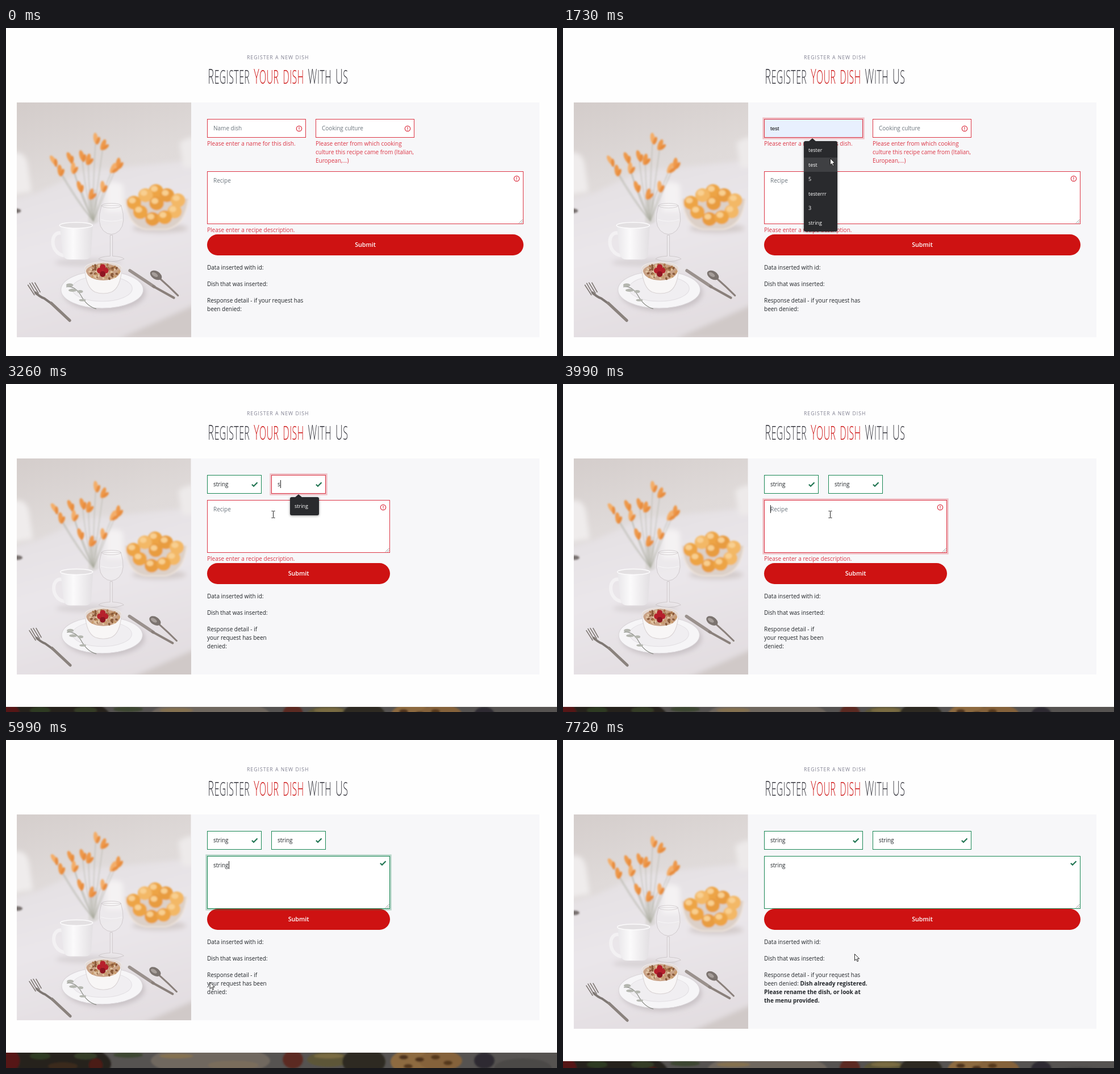
Animation of 970 by 577 pixels, one loop 8 s. Source, as an HTML page:

```html
<!DOCTYPE html>
<html lang="en">
<head>
<meta charset="utf-8">
<title>Register a dish</title>
<style>
  html, body { margin: 0; width: 100%; height: 100%; overflow: hidden; }
  body { background: #fefefe; font: 10px/15px "Open Sans", sans-serif; color: #212529; }
  #stage { position: relative; width: 970px; height: 577px; overflow: hidden; }
  .over, h2 { position: absolute; margin: 0; white-space: nowrap; text-transform: uppercase; }
  .over { left: 424px; top: 45px; font-size: 8.7px; letter-spacing: 1px; color: #7f7f90; }
  h2 { left: 0; top: 64px; width: 958px; display: flex; justify-content: center; font-size: 33px;
       line-height: 40px; font-weight: 300; color: #37373f; transform: scaleX(.48); }
  h2 span { white-space: pre; word-spacing: 5px; letter-spacing: 1px; }
  h2 b { font-size: 37px; font-weight: 300; }
  h2 em { font-style: normal; color: #ce1212; }
  #panel { position: absolute; left: 19px; top: 131px; width: 920px; box-sizing: border-box;
           padding: 29px 0 28px 335px; background: #f7f7f9; }
  #photo { position: absolute; left: 0; top: 0; width: 306.5px; height: 100%; }
  .row { display: flex; gap: 17px; align-items: flex-start; margin-bottom: 11px; }
  .col { white-space: nowrap; }
  .field { position: relative; box-sizing: border-box; height: 33px; padding: 0 10px; border: 1px solid;
           background: #fff; line-height: 31px; white-space: pre; }
  .field.area { height: 93px; padding-top: 8px; line-height: 15px; }
  .hint { color: #6c757d; }
  .preview { background: #e8f0fe; }
  .preview .hint { color: #000; font-family: "Liberation Sans", Arial, sans-serif; font-size: 9.6px; }
  .preview .icon { display: none; }
  .caret { display: inline-block; width: 1px; height: 14px; margin-right: -1px; vertical-align: -3px; background: #222; }
  .icon { position: absolute; right: 5.5px; top: 9.5px; width: 12px; height: 12px; fill: none; }
  .area .icon { top: 5.5px; }
  .grip { position: absolute; right: 0; bottom: 0; width: 8px; height: 8px; stroke: #777; stroke-width: .8; }
  .error { margin-top: 3px; color: #dc3545; }
  #submit { height: 37px; border-radius: 19px; color: #fff; font-size: 10.7px; line-height: 37px;
            font-weight: 600; text-align: center; }
  p { margin: 14px 0; white-space: nowrap; }
  #strip { position: absolute; left: -19px; top: calc(100% + 57px); width: 970px; height: 40px; }
  #menu { position: absolute; top: 199px; padding: 3px 0; border-radius: 3px; background: #292a2d;
          color: #fff; font-size: 9px; line-height: 25.5px; box-shadow: 0 1px 4px #0006; }
  #menu div { padding-left: 8px; }
  #menu .on { background: #3f4043; }
  #tip { position: absolute; top: 193.5px; border: solid transparent; border-width: 0 7px 6px; border-bottom-color: #292a2d; }
  #mouse { position: absolute; left: 0; top: 0; width: 1px; height: 1px; overflow: visible; }
</style>
</head>
<body>
<div id="stage">
  <div class="over">Register a new dish</div>
  <h2><span><b>R</b>egister <em><b>Y</b>our dish</em> <b>W</b>ith <b>U</b>s</span></h2>

  <div id="panel">
    <svg id="photo" viewBox="0 0 306 405" preserveAspectRatio="xMidYMid slice">
      <defs>
        <linearGradient id="wall" x2=".2" y2="1">
          <stop stop-color="#d3ccca"/><stop offset=".35" stop-color="#dfdad9"/><stop offset="1" stop-color="#e6e1e3"/>
        </linearGradient>
        <linearGradient id="cloth" x2=".3" y2="1">
          <stop stop-color="#e2dee0"/><stop offset=".5" stop-color="#eae6ea"/><stop offset="1" stop-color="#e2dde0"/>
        </linearGradient>
        <linearGradient id="china"><stop stop-color="#e9e7ea"/><stop offset=".4" stop-color="#fbfafb"/><stop offset="1" stop-color="#e2dfe2"/></linearGradient>
        <filter id="soft" x="-30%" y="-30%" width="160%" height="160%"><feGaussianBlur stdDeviation="4"/></filter>
        <filter id="haze" x="-30%" y="-30%" width="160%" height="160%"><feGaussianBlur stdDeviation="1.5"/></filter>
      </defs>
      <rect width="306" height="405" fill="url(#wall)"/>
      <g filter="url(#soft)">
        <path d="M-20 172L40 155 120 118 326 98V430H-20Z" fill="url(#cloth)"/>
        <path d="M-9 88Q18 80 22 110L28 154-9 160Z" fill="#efecec"/>
        <path d="M284 70Q300 56 320 62V112H290Z" fill="#edeaea"/>
        <path d="M156 142q12-10 30 0l2 46h-32z" fill="#f4f2f3"/>
        <path d="M326 342L178 408H326Z" fill="#d0c9c8"/>
        <ellipse cx="126" cy="276" rx="58" ry="7" fill="#d8d3d6"/>
        <ellipse cx="250" cy="217" rx="48" ry="8" fill="#d3cbca"/>
      </g>
      <ellipse cx="1" cy="187" rx="9" ry="4" fill="#77706e" filter="url(#haze)"/>
      <g filter="url(#haze)">
        <path d="M190 166Q194 214 226 219H262Q294 212 299 166Z" fill="#dcd0c8"/>
        <g id="fruit"></g>
        <path d="M190 166Q194 214 226 219H262Q294 212 299 166" fill="none" stroke="#efe6df" stroke-width="3" opacity=".7"/>
        <path d="M127 150L126 206Q134 214 143 206L140 150Z" fill="#cbc9c4" opacity=".5"/>
        <g id="flowers"></g>
      </g>
      <path d="M82 226C60 218 58 260 84 264" fill="none" stroke="#f3f1f3" stroke-width="6"/>
      <path d="M77 212L82 261Q84 271 94 271H120Q130 271 131 261L134 212Z" fill="url(#china)"/>
      <ellipse cx="105" cy="212" rx="28.5" ry="5" fill="#e3e0e2" stroke="#fcfbfc" stroke-width="1.5"/>
      <g fill="#fff" fill-opacity=".15" stroke="#b9b3b5" stroke-width=".8" stroke-opacity=".7">
        <path d="M149 178Q140 208 152 221 166 234 180 221 192 208 183 178Z"/>
        <ellipse cx="166" cy="178" rx="17" ry="4"/>
        <path d="M148 202q18 6 37 0" stroke="#fff" fill="none"/>
        <path d="M164 229v36q-17 1-20 5 22 9 44 0-3-4-20-5v-36z"/>
      </g>
      <ellipse cx="154" cy="328" rx="71" ry="32" fill="#c9c2c6" filter="url(#soft)"/>
      <ellipse cx="150" cy="323" rx="71" ry="32" fill="#f6f5f7" stroke="#d9d5d9"/>
      <ellipse cx="150" cy="321" rx="52" ry="22" fill="#f0eef1" stroke="#e2dfe3"/>
      <path d="M120 286Q122 320 138 327 152 332 166 327 182 320 184 286Z" fill="#f8f6f6" stroke="#d9d3d4"/>
      <ellipse cx="152" cy="286" rx="32" ry="11" fill="#e4dad4" stroke="#eeeaea"/>
      <path d="M122 291Q124 281 152 277 180 281 182 291 178 306 152 307 126 306 122 291Z" fill="#c9a286"/>
      <g id="granola"></g>
      <g fill="#b6202c"><circle cx="146" cy="290" r="5"/><circle cx="156" cy="290" r="5"/><circle cx="151" cy="284" r="5"/><circle cx="151" cy="296" r="5" fill="#8f1522"/></g>
      <path d="M88 318Q104 316 114 334T140 356" fill="none" stroke="#7d8078" stroke-width="1"/>
      <g fill="#b4b6af"><ellipse cx="94" cy="315" rx="6" ry="3"/><ellipse cx="99" cy="324" rx="7" ry="2.500"/><ellipse cx="112" cy="326" rx="5" ry="2.500"/><ellipse cx="116" cy="341" rx="6" ry="2"/></g>
      <g fill="none" stroke-linecap="round">
        <path d="M25 312L36 331M29 311L40 329M34 311L43 327M22 315L33 332" stroke="#7e7773" stroke-width="1.600"/>
        <path d="M35 328Q42 335 50 338L64 348" stroke="#7e7773" stroke-width="4"/>
        <path d="M62 346L94 376" stroke="#8a827d" stroke-width="5"/>
        <path d="M198 290L240 318" stroke="#9a918d" stroke-width="5.500"/>
        <path d="M238 317L274 337" stroke="#8a807b" stroke-width="4"/>
        <path d="M249 303Q266 318 281 333" stroke="#8a807b" stroke-width="3"/>
      </g>
      <ellipse cx="243" cy="298" rx="11" ry="7" transform="rotate(32 243 298)" fill="#7b736f"/>
      <ellipse cx="241" cy="297" rx="6" ry="3" transform="rotate(32 241 297)" fill="#a69e9a"/>
    </svg>

    <div id="form">
      <div class="row">
        <div class="col"><div class="field" id="name"></div><div class="error">Please enter a name for this dish.</div></div>
        <div class="col"><div class="field" id="culture"></div><div class="error">Please enter from which cooking<br>culture this recipe came from (Italian,<br>European,...)</div></div>
      </div>
      <div class="field area" id="recipe"></div><div class="error">Please enter a recipe description.</div>
      <div id="submit">Submit</div>
      <p>Data inserted with id:</p>
      <p>Dish that was inserted:</p>
      <p id="reply"></p>
    </div>

    <svg id="strip" viewBox="0 0 970 40"><rect width="970" height="40" fill="#565351"/><g id="food" filter="url(#haze)"></g></svg>
  </div>

  <div id="tip"></div>
  <div id="menu"></div>
  <svg id="mouse">
    <circle id="click" r="8.5" fill="#f5a614" opacity=".9"/>
    <path id="arrow" d="M0 0V11.5L2.7 9 4.6 13.2 6.4 12.4 4.6 8.3H8.2Z" fill="#fff" stroke="#111" stroke-width=".9"/>
    <path id="beam" d="M-3-6H-1Q0-6 0-5 0-6 1-6H3M0-5V5M-3 6H-1Q0 6 0 5 0 6 1 6H3" fill="none" stroke="#222"/>
    <path id="hand" d="M-1.3 1Q0-1 1.3 1V6Q3 5 4 6.5 5.5 5.7 6.3 7 8 6.5 8 8.5V12Q7.5 14 6.5 16.5H.5Q-1 13.5-3.5 10.5-3.5 8.5-1.3 10Z" fill="#fff" stroke="#111" stroke-width=".9"/>
  </svg>
</div>

<script>
const LOOP = 8000, BLINK = 530, FADE = 150;
const CLICK = 7060, REPLY = 7330;
const RED = [220, 53, 69], GREEN = [25, 135, 84], BRAND = [206, 18, 18], BRIGHT = [236, 39, 39];
const $ = id => document.getElementById(id);
const ramp = (t, from, span) => Math.min(1, Math.max(0, (t - from) / span));
const mix = (a, b, p) => a.map((v, i) => Math.round(v + (b[i] - v) * p));
const last = (list, t) => list.filter(k => k[0] <= t).pop();
const show = (el, on) => { el.style.display = on ? "" : "none"; };

// Still life details
let seed = 7;
const rand = () => (seed = seed * 16807 % 2147483647) / 2147483647;
const blob = (x, y, rx, ry, fill, turn = 0) =>
  `<ellipse cx="${x}" cy="${y}" rx="${rx}" ry="${ry}" fill="${fill}" transform="rotate(${turn} ${x} ${y})"/>`;

$("fruit").innerHTML = [[243, 153], [225, 160], [262, 160], [205, 173], [281, 169], [244, 174], [216, 189], [275, 188], [237, 201], [258, 198]]
  .map(([x, y], i) => blob(x, y, 12.5, 12, ["#eda445", "#f3b866", "#e89c40"][i % 3]) + blob(x - 3, y - 4, 6, 5, "#f8cf90")).join("");

$("flowers").innerHTML = [[66, 100], [77, 117], [94, 95], [100, 113], [115, 92], [126, 98], [139, 62], [152, 73], [178, 105], [169, 113], [111, 145], [131, 158], [151, 145]]
  .map(([x, y], i) => {
    const turn = (x - 128) * .35 + (i % 2 ? 12 : -12);
    return `<path d="M135 205Q${128 + (x - 128) * .45} 165 ${x} ${y}" fill="none" stroke="#a9aa9c" opacity=".75"/>`
      + blob(x, y, 4, 10, i % 3 ? "#ee984a" : "#f4ad68", turn) + blob(x + 4, y + 4, 3, 7, "#e88c3c", turn + 30);
  }).join("");

$("granola").innerHTML = Array.from({ length: 80 }, (_, i) => {
  const a = rand() * 6.283, r = Math.sqrt(rand());
  return blob(152 + 28 * r * Math.cos(a), 292 + 13 * r * Math.sin(a), 2.5, 1.8, ["#a9764c", "#c79a6d", "#8a5a3a", "#e0c4a2"][i % 4], a * 57);
}).join("");

$("food").innerHTML = [
  [75, 20, 110, 40, "#25201c"], [8, 14, 16, 18, "#571519"], [60, 6, 18, 6, "#2f3a22"], [100, 24, 26, 7, "#3a2a1e"], [140, 6, 20, 6, "#343d27"], [158, 22, 12, 12, "#4b1a18"],
  [215, 4, 26, 5, "#3d4630"], [360, 14, 105, 26, "#6f675f"], [300, 6, 30, 4, "#85714f"], [400, 22, 45, 8, "#7a6d5c"],
  [505, 12, 18, 16, "#5b2a24"], [568, 12, 38, 13, "#5d5638"], [568, 6, 26, 4, "#7a6c42"], [630, 16, 38, 24, "#2e2a20"],
  [715, 16, 38, 22, "#8d6a40"], [765, 14, 38, 18, "#85623a"], [700, 8, 8, 4, "#4d321d"], [728, 12, 8, 4, "#4d321d"], [756, 8, 8, 4, "#54381f"], [778, 18, 8, 4, "#54381f"], [708, 24, 8, 4, "#54381f"],
  [842, 14, 18, 14, "#2d2c31"], [910, 26, 50, 16, "#4b4847"]
].map(b => blob(...b)).join("");

// Form fields: when each gains focus, becomes valid, is typed into and loses focus
const letters = (times, word = "string") => times.map((t, i) => [t, word.slice(0, i + 1)]);
const fields = [
  { id: "name", label: "Name dish", focus: 1190, blink: 1200, valid: 2330, blur: 2930, keys: [[2330, "s"], [2730, "string"]] },
  { id: "culture", label: "Cooking culture", focus: 2930, blink: 2930, valid: 3260, blur: 3800, keys: [[3260, "s"], [3530, "string"]] },
  { id: "recipe", label: "Recipe", focus: 3800, blink: 3800, valid: 4060, blur: 6990, keys: letters([4060, 4320, 4460, 4550, 4630, 4720]) }
];
for (const f of fields) {
  const el = f.el = $(f.id);
  el.innerHTML = `<span class="val"></span><i class="caret"></i><span class="hint"></span>
    <svg class="icon bad" viewBox="0 0 12 12" stroke="#dc3545" stroke-width="1.2"><circle cx="6" cy="6" r="4.7"/><path d="M6 3.2V6.7M6 7.7V9"/></svg>
    <svg class="icon good" viewBox="0 0 12 12" stroke="#217552" stroke-width="2.2"><path d="M.9 5.7L4 8.8 10.5 2.2"/></svg>`.replace(/>\s+</g, "><")
    + (f.id === "recipe" ? '<svg class="grip" viewBox="0 0 8 8"><path d="M1 7.5L7.5 1M4.5 7.5L7.5 4.5"/></svg>' : "");
  for (const part of ["val", "caret", "hint", "bad", "good"]) f[part] = el.querySelector("." + part);
  f.error = el.nextElementSibling;
}

function drawField(f, t, preview) {
  const key = last(f.keys, t), valid = t >= f.valid, focused = t >= f.focus && t < f.blur;
  const color = mix(RED, GREEN, ramp(t, f.valid, FADE));
  const glow = .27 * ramp(t, f.focus, FADE) * (1 - ramp(t, f.blur, FADE));
  f.val.textContent = key && !preview ? key[1] : "";
  f.hint.textContent = preview || (key ? "" : f.label);
  f.el.classList.toggle("preview", !!preview);
  f.el.style.borderColor = `rgb(${color})`;
  f.el.style.boxShadow = glow ? `0 0 0 2.7px rgba(${color},${glow})` : "none";
  const since = t - Math.max(f.blink, key ? key[0] : 0);
  show(f.caret, focused && since >= 0 && Math.floor(since / BLINK) % 2 === 0);
  show(f.bad, !valid);
  show(f.good, valid);
  show(f.error, !valid);
}

// Suggestion lists
const recent = ["tester", "test", "5", "testerrr", "3", "string"];
const menus = [
  { from: 1260, to: 2330, x: 424, w: 59, tip: 438.5, items: recent, field: 0, picks: [[1350, 0], [1440, 1]] },
  { from: 2330, to: 2730, x: 424, w: 51, tip: 438.5, items: ["string"], field: 0, picks: [[2600, 0]] },
  { from: 3260, to: 3530, x: 500, w: 51, tip: 515, items: ["string"], field: 1, picks: [[3430, 0]] }
];

function drawMenu(t) {
  const m = menus.find(m => t >= m.from && t < m.to);
  show($("menu"), m);
  show($("tip"), m);
  if (!m) return {};
  const pick = (last(m.picks, t) || [0, -1])[1];
  $("menu").style.left = m.x + "px";
  $("menu").style.width = m.w + "px";
  $("tip").style.left = m.tip - 7 + "px";
  $("menu").innerHTML = m.items.map((s, i) => `<div${i === pick ? ' class="on"' : ""}>${s}</div>`).join("");
  return { field: m.field, text: m.items[pick] };
}

// Pointer path and shapes
const path = [[130, 881, 490], [930, 462, 183], [1270, 462, 183], [1470, 470.5, 229.5], [5260, 470.5, 229.5], [5440, 440, 320],
  [5700, 314, 519], [5860, 325, 490], [6060, 372, 402], [6460, 480, 331], [6660, 520, 324], [7260, 520, 324], [7720, 513.5, 376.5]];
const shapes = [[0, "arrow"], [540, "beam"], [1330, "arrow"], [3260, "beam"], [5400, "hand"], [5480, "arrow"], [6460, "hand"], [7370, "arrow"]];

function drawMouse(t) {
  const next = path.findIndex(k => k[0] > t);
  const b = next < 0 ? path[path.length - 1] : path[next], a = next > 0 ? path[next - 1] : b;
  const p = ramp(t, a[0], b[0] - a[0] || 1), e = p * p * (3 - 2 * p);
  $("mouse").style.transform = `translate(${a[1] + (b[1] - a[1]) * e}px,${a[2] + (b[2] - a[2]) * e}px)`;
  show($("mouse"), t >= 130);
  const shape = last(shapes, t)[1];
  for (const s of ["arrow", "beam", "hand"]) show($(s), s === shape);
  show($("click"), (t >= 1060 && t < 1190) || (t >= CLICK && t < CLICK + 200));
}

const answer = {
  wide: "Response detail - if your request has<br>been denied:",
  narrow: "Response detail - if<br>your request has been<br>denied:",
  denied: " <b>Dish already registered.<br>Please rename the dish, or look at<br>the menu provided.</b>"
};
let shown;

function draw(t) {
  const narrow = t >= 3260 && t < REPLY;
  const preview = drawMenu(t);
  fields.forEach((f, i) => drawField(f, t, preview.field === i && preview.text));
  document.querySelectorAll(".col").forEach(c => { c.style.width = (narrow ? 96 : 174) + "px"; });
  $("form").style.width = (narrow ? 322 : t >= 2330 && t < REPLY ? 556 : 557) + "px";
  const text = answer[narrow ? "narrow" : "wide"] + (t >= REPLY ? answer.denied : "");
  if (text !== shown) $("reply").innerHTML = shown = text;
  const brush = .2 * ramp(t, 5400, 80) * (1 - ramp(t, 5480, 80));
  const hover = ramp(t, 6460, 400) * (1 - ramp(t, 7370, 340));
  $("submit").style.background = `rgb(${mix(BRAND, BRIGHT, Math.max(brush, hover))})`;
  drawMouse(t);
}

const start = performance.now();
function tick() {
  draw((performance.now() - start) % LOOP);
  requestAnimationFrame(tick);
}
tick();
</script>
</body>
</html>
```
